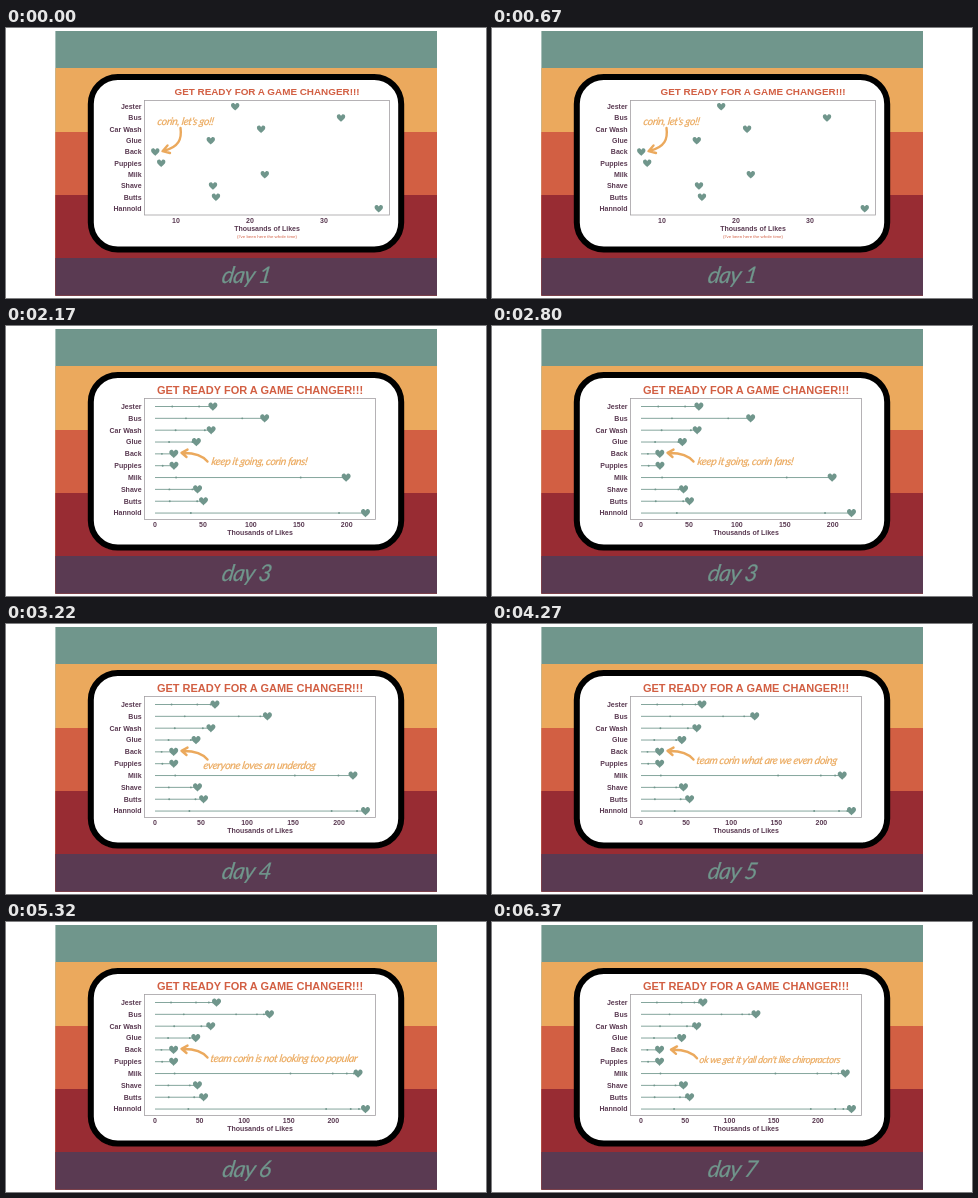
Recreate the animation shown at these times as an HTML page. Size 480 by 270 pixels, loop 7.42 s.

```html
<!DOCTYPE html>
<html lang="en">
<head>
<meta charset="utf-8">
<title>Game changer chart</title>
<style>
html, body { margin: 0; width: 100%; height: 100%; overflow: hidden; background: #fff; }
svg { display: block; width: 100%; height: 100%; }
text { font-family: "Liberation Sans", Arial, sans-serif; }
.bold { font-weight: 700; }
.script { font-family: Lato, "Open Sans", sans-serif; font-style: italic; letter-spacing: -0.035em; }
</style>
</head>
<body>
<svg id="stage" viewBox="0 0 480 270">
  <rect width="480" height="270" fill="#fff"/>
  <g id="stripes"></g>
  <rect x="84.8" y="49" width="310.4" height="172.5" rx="27" fill="#fff" stroke="#000" stroke-width="6"/>
  <g id="chart"></g>
</svg>
<script>
const TEAL = '#70968c', ORANGE = '#eba95d', RUST = '#d25f43', RED = '#982c33', PLUM = '#5a3a52';
const FIRST = 1120, STEP = 1050, LOOP = 7420;

// Thousands of likes on days 1, 2 and 7
const posts = [
  ['Jester', 18, 46, 70],
  ['Bus', 32.3, 91, 130],
  ['Car Wash', 21.5, 52, 63],
  ['Glue', 14.7, 39, 46],
  ['Back', 7.2, 17.5, 21],
  ['Puppies', 8, 18, 21],
  ['Milk', 22, 152, 231],
  ['Shave', 15, 39, 48],
  ['Butts', 15.4, 44, 55],
  ['Hannold', 37.4, 192, 238]
];

// Growth slows with the reciprocal of the days gone by
function likes([, first, second, last], day) {
  return day === 1 ? first : last - (last - second) * (6 / (day - 1) - 1) / 5;
}

const notes = [
  ["corin, let's go!!", 151, 97],
  ['corin!!', 209, 133],
  ['keep it going, corin fans!', 205, 138.5],
  ['everyone loves an underdog', 197, 145],
  ['team corin what are we even doing', 204, 139.5],
  ['team corin is not looking too popular', 204, 139.5],
  ["ok we get it y'all don't like chiropractors", 207, 141]
];

const arrowDown = 'M174.5 100C176 111 173 119 157.5 123M161.5 117.5L156.5 123.2L164 125';
const arrowUnder = 'M204 132.5Q190 136 178 128.3M184 127L177 127.6L181 133.5';
const arrowOver = 'M201.5 135.5Q194 126.5 176 127M181.5 123.6L175.5 126.8L180.5 131';

const attrs = o => Object.entries(o).map(([k, v]) => ` ${k}="${v}"`).join('');
const tag = (name, o, body = '') => `<${name}${attrs(o)}>${body}</${name}>`;
const label = (str, x, y, size, fill, anchor = 'middle', cls = 'bold') =>
  tag('text', { x, y, fill, 'font-size': size, 'text-anchor': anchor, class: cls }, str);
const script = (str, x, y, size, fill, anchor) =>
  tag('g', { transform: `translate(${x} ${y}) skewX(-9)`, stroke: fill, 'stroke-width': 0.2 },
    label(str, 0, 0, size, fill, anchor, 'script'));
const heart = (x, y, s) => tag('path', {
  d: 'M0 4.2C-1.2 2.5-4.5 1-4.5-1.6C-4.5-4.4-1-5 0-2.3C1-5 4.5-4.4 4.5-1.6C4.5 1 1.2 2.5 0 4.2Z',
  transform: `translate(${x} ${y}) scale(${s})`, fill: TEAL
});
const panel = (width, height) => tag('rect', {
  x: 138.5, y: 72.5, width, height, fill: '#fff', stroke: '#a3a0a3', 'stroke-width': 0.8
});

function arrow(day) {
  return tag('path', {
    d: [arrowDown, arrowUnder][day - 1] || arrowOver,
    transform: `translate(${day === 7 ? '3.5 0.8' : '0 0'})`, fill: 'none', stroke: ORANGE,
    'stroke-width': 2.4, 'stroke-linecap': 'round', 'stroke-linejoin': 'round'
  });
}

function note(day) {
  const [str, x, y] = notes[day - 1];
  return arrow(day) + script(str, x, y, Math.min(10.6, 412 / str.length), ORANGE, 'start');
}

function row(post, y, day, xOf) {
  const x = xOf(likes(post, day));
  let out = label(post[0], 135.6, y + 2.4, 7.02, PLUM, 'end');
  if (day === 1) return out + heart(x, y, 0.93);
  out += tag('path', { d: `M149 ${y}H${x}`, stroke: TEAL, 'stroke-width': 0.85 });
  for (let d = 1; d < day; d++) {
    out += tag('circle', { cx: xOf(likes(post, d)), cy: y, r: 0.95, fill: TEAL });
  }
  return out + heart(x, y, 1);
}

function chart(day) {
  const start = day === 1;
  const mid = start ? 261 : 254;
  const bottom = start ? 187 : 193.5;
  const gap = start ? 11.33 : 11.84;
  const unit = start ? 7.4 : 210.5 / likes(posts[9], day);
  const xOf = v => (start ? 96 : 149) + v * unit;
  const ticks = start ? [10, 20, 30] : [0, 50, 100, 150, 200];

  let out = label('GET READY FOR A GAME CHANGER!!!', mid, start ? 67.2 : 67.8, start ? 9.9 : 11, RUST);
  out += panel(start ? 245 : 231, bottom - 72.5);
  posts.forEach((post, i) => { out += row(post, (start ? 78.7 : 80.5) + i * gap, day, xOf); });
  ticks.forEach(v => { out += label(v, xOf(v), bottom + 7.6, 7, PLUM); });
  out += label('Thousands of Likes', mid, bottom + 15.6, 7, PLUM);
  if (start) out += label("(I've been here the whole time)", mid, 210.2, 4.38, RUST, 'middle', '');
  return out + note(day) + script('day ' + day, 239.5, 254.5, 23, TEAL, 'middle');
}

// Each stripe runs to the foot, so the next one covers it without a seam
const tops = [3, 40, 104, 167, 230];
document.getElementById('stripes').innerHTML = [TEAL, ORANGE, RUST, RED, PLUM].map((fill, i) =>
  tag('rect', { x: 49.4, y: tops[i], width: 381.6, height: 267.6 - tops[i], fill })).join('');

const view = document.getElementById('chart');
const origin = performance.now();
let shown = 0;

function draw(now) {
  const t = Math.max(0, now - origin) % LOOP;
  const day = t < FIRST ? 1 : 2 + Math.floor((t - FIRST) / STEP);
  if (day !== shown) view.innerHTML = chart(shown = day);
  requestAnimationFrame(draw);
}
draw(origin);
</script>
</body>
</html>
```
